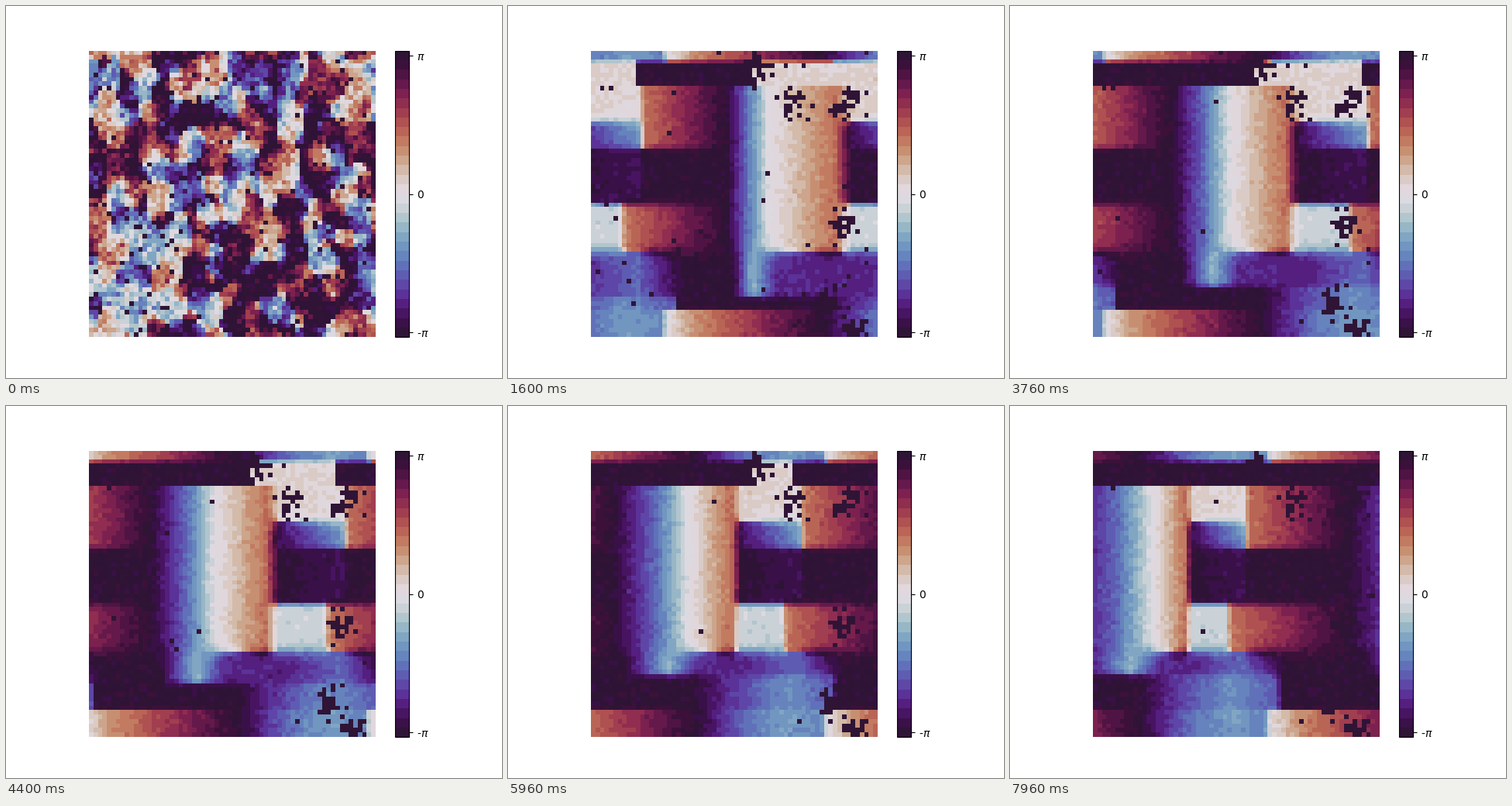
Animation, 640 px wide and 480 px high, one loop 8 s. Source, as a matplotlib script:

```python
import numpy as np
import matplotlib.pyplot as plt
from matplotlib.animation import FuncAnimation

N, FRAMES, STEP = 64, 200, 40
REF = 5.08  # seconds at which key points are placed
DRIFT = 6.5  # cells per second, leftwards
rng = np.random.default_rng(11)
cols = np.arange(N) + 0.5
rows = cols[:, None]

# Key points are (column, phase / pi), unwrapped from left to right.
STRIPE = [(10, 1), (18.5, 1.45), (25.6, 2), (36, 2.42)]
FOOT = [(12.5, 1), (21, 1.75), (27, 1.25), (40, 1.2), (52, 1.45), (62, 1)]
FLOOR = [(29, 1), (36, 1.25), (49, 1.6), (60, 1.4), (60.5, 1)]
EDGE = [(0, 0.3), (29, 1), (41, 1.5), (50, 1.65), (57, 1.55), (58.5, 2)]
CLUMPS = [(44.5, 12), (37, 4), (57.5, 12), (58.5, 62.5), (56, 39), (54, 56.5)]

white = np.fft.fft2(rng.normal(size=(N, N)) + 1j * rng.normal(size=(N, N)))
jitter = rng.normal(size=(N, N))
speckle = rng.random((N, N))
k = 2 * np.pi * np.fft.fftfreq(N)
k2 = k ** 2 + 1.7 * k[:, None] ** 2

density = sum(np.exp(-((cols - c) ** 2 + (rows - r) ** 2) / 7)
              for c, r in CLUMPS)
pinned = rng.random((N, N)) < 0.9 * density


def smoothstep(x):
    x = np.clip(x, 0, 1)
    return x * x * (3 - 2 * x)


def unit(phase):
    return np.exp(1j * np.pi * phase)


def travel(points, turns, t, slow=0.0):
    """One periodic band; points near the stripe travel more slowly."""
    u, p = np.array(points, float).T
    speed = DRIFT - slow * np.exp(-((u - 25) / 13) ** 2)
    x = u - speed * (t - REF)
    shifts = range(-2, 3)
    xs = np.concatenate([x + N * s for s in shifts])
    ps = np.concatenate([p + 2 * turns * s for s in shifts])
    return unit(np.interp(cols, xs, ps))


def stripe(t, start, end, tail, stop=53):
    """The light stripe, a patch behind it, then a tail up to the next turn."""
    patch = [(38.5, start), (stop - 1, end), (stop + 0.5, tail)]
    return travel(STRIPE + patch, tail // 2, t, slow=2.4)


def dark_bar(t):
    front = 51 - DRIFT * (t - REF)
    dark = (cols >= front) | ((cols < 36) & (cols >= front - N))
    return unit(np.where(dark, 1, 0.08))


def pattern(t):
    edge = travel(EDGE, 1, t)
    foot_end = max(50, 51.2 - 1.1 * (t - REF))
    bands = [  # first row, softness, band
        (2.5, 0.05, dark_bar(t)),
        (7.8, 0.1, stripe(t, 2.1, 2.05, 2.4)),
        (16, 0.9, stripe(t, 3.1, 3.6, 4.4)),
        (21.8, 0.3, stripe(t, 3, 3.1, 3)),
        (34.4, 0.5, stripe(t, 1.9, 1.9, 2.4, stop=49)),
        (45, 0.9, travel(FOOT, 0, t, slow=2.4)),
        (foot_end, 0.4, travel(FLOOR, 0, t)),
        (57.7, 0.1, edge),
    ]
    z = np.tile(edge, (N, 1))
    for first, soft, band in bands:
        w = 0.5 + 0.5 * np.tanh((rows - first) / (2 * soft))
        z = z * (1 - w) + band * w
    return z


def noise(t):
    z = np.fft.ifft2(white * np.exp(-k2 * (1.4 + 3 * t) ** 2 / 2))
    return z / np.sqrt(np.mean(np.abs(z) ** 2))


def field(i):
    t = i * STEP / 1000
    w = smoothstep(t / 1.5)
    z = w * pattern(t) + (1 - w) * noise(t)
    shake = 0.07 + 0.28 * np.exp(-t / 0.25)
    phase = np.angle(z * np.exp(1j * shake * jitter)) / np.pi
    phase = np.clip(phase * (1 + 0.15 * (1 - w)), -1, 1)
    # Stray dark cells thin out, clumps appear as the pattern settles.
    phase[speckle < 0.035 * np.exp(-t / 1.5) + 0.002] = 1
    phase[pinned & (speckle < w)] = 1
    return phase * np.pi


fig, ax = plt.subplots(figsize=(6.4, 4.8), dpi=100)
image = ax.imshow(field(0), cmap=plt.get_cmap("twilight_shifted", 30),
                  vmin=-3.25, vmax=3.255, interpolation="nearest")
ax.axis("off")
bar = fig.colorbar(image, ax=ax, ticks=[-np.pi, 0, np.pi])
bar.ax.set_yticklabels([r"-$\pi$", "0", r"$\pi$"])


def update(i):
    image.set_data(field(i))
    return [image]


anim = FuncAnimation(fig, update, frames=FRAMES, interval=STEP,
                     repeat=True, repeat_delay=0, blit=False)
plt.show()
```
